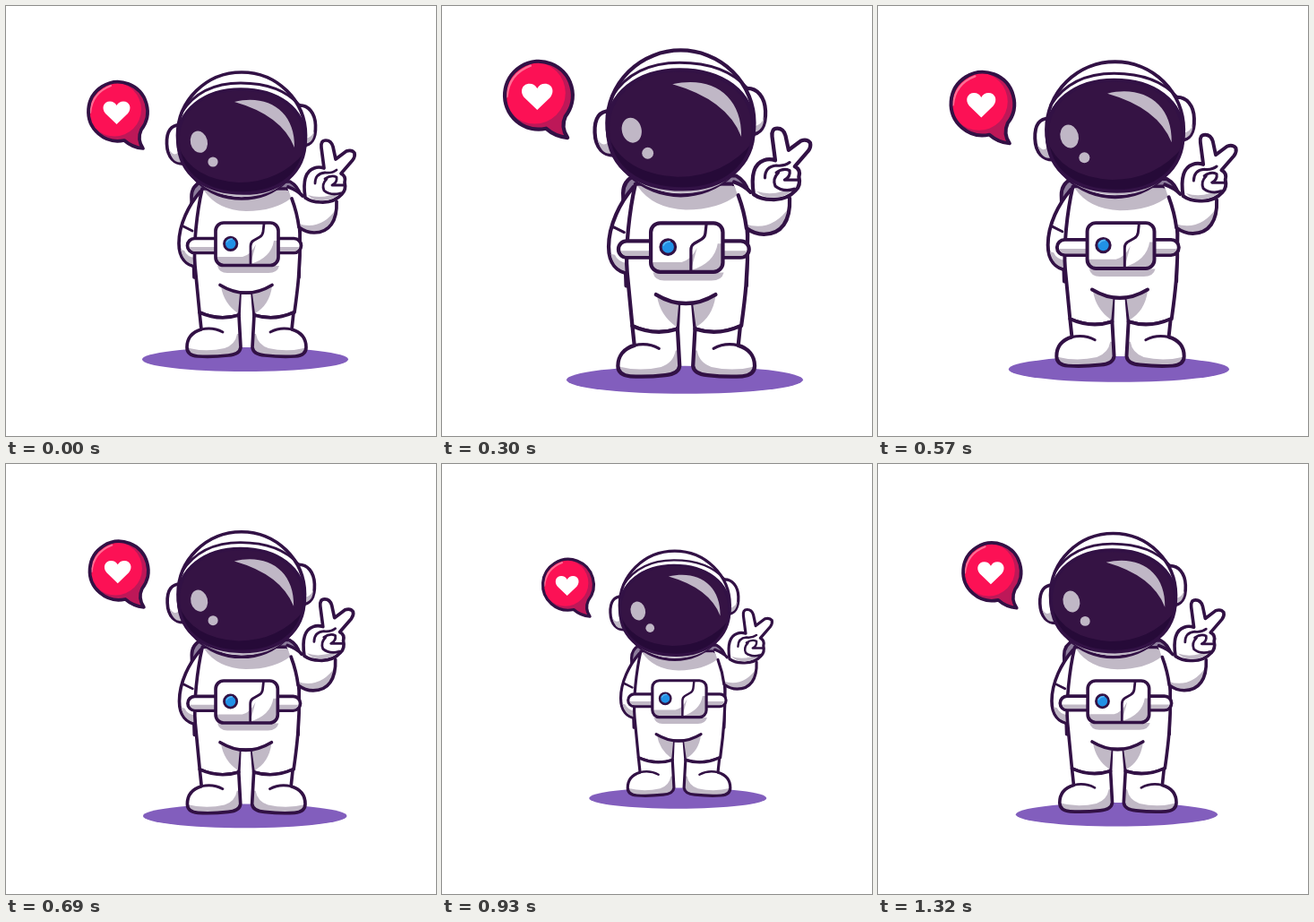
An HTML page that plays this animation: 480x480 px, repeating every 1350 ms.

```html
<!DOCTYPE html>
<html lang="en">
<head>
<meta charset="utf-8">
<title>Astronaut</title>
<style>
  html, body { margin: 0; width: 100%; height: 100%; overflow: hidden; background: #fff; }
  svg { display: block; width: 100%; height: 100%; }
  .line { fill: none; stroke: #321145; stroke-width: 3.7; stroke-linecap: round; stroke-linejoin: round; }
  .thin { stroke-width: 2.8; }
  .suit { fill: #fff; }
  .shade { fill: #c1b9c6; }
  .glass { fill: #351344; }
  .glint { fill: #c0b7c6; }
</style>
</head>
<body>
<svg viewBox="0 0 480 480">
  <defs>
    <path id="bootShape" d="M216 342Q238 352 260 345L262 381Q261 389 248 390Q230 392 214 391Q202 390 202 381C202 371 208 364 218 361Z"/>
    <path id="visorShape" d="M192 151C191 116 222 93 262 93C303 93 334 114 334 150C334 186 306 209 265 209C224 209 193 190 192 151Z"/>
    <path id="bubbleShape" d="M132 150A33 33 0 1 1 151 138Q146 149 153 159Q141 158 132 150Z"/>
    <clipPath id="bootClip"><use href="#bootShape"/></clipPath>
    <clipPath id="visorClip"><use href="#visorShape"/></clipPath>
    <clipPath id="pouchClip"><rect x="234" y="242" width="70" height="48" rx="9"/></clipPath>
    <g id="boot">
      <use class="suit" href="#bootShape"/>
      <path class="shade" clip-path="url(#bootClip)" d="M200 381Q222 387 244 382Q256 378 258 366H266V396H198Z"/>
      <use class="line" href="#bootShape"/>
      <path class="line thin" d="M218 361Q231 358 242 364"/>
    </g>
  </defs>
  <g id="scene">
    <ellipse cx="267" cy="394.500" rx="115" ry="13.500" fill="#825ebd"/>

    <!-- backpack and left arm -->
    <path class="line" style="fill:#8d7d9c" d="M218 196Q207 201 207 213L210 303H327L329 212Q326 201 317 196Z"/>
    <path class="line suit" d="M217 207C204 222 193 244 193 265C193 281 201 290 213 291L222 225Z"/>
    <path class="shade" d="M195 272Q198 287 211 289V281Q202 280 199 273Z"/>
    <path class="line thin" d="M198 246L208 251"/>

    <!-- body -->
    <path class="line suit" d="M219 204C213 230 209 268 211 290L216 342Q238 352 260 345L261 320H275L277 345Q300 352 322 342C325 320 329 292 328 254C327 230 323 214 314 204Z"/>
    <path class="shade" d="M221 206H315L319 214Q300 229 268 229Q236 228 221 206ZM236 290H305Q303 298 293 298H247Q238 298 236 290ZM240 313Q268 325 297 313Q294 334 278 343L275 321H261L259 343Q243 332 240 313Z"/>
    <path class="line" d="M239 311.500Q268 329 297 311.500"/>
    <use href="#boot"/>
    <use href="#boot" transform="matrix(-1 0 0 1 537 0)"/>

    <!-- raised arm -->
    <path class="suit" d="M314 203Q326 207 331 213L369 218C370 240 361 253 344 253Q334 252 327 247L319 216Z"/>
    <path class="shade" d="M326 243Q352 251 369 226Q367 253 344 253Q334 252 327 247Z"/>
    <path class="line" d="M315 202Q326 206 331 212M319 215Q325 231 327 247Q335 253 344 253C361 253 370 240 369 218"/>

    <!-- belt and pouch -->
    <rect class="line suit" x="202.500" y="259.500" width="127" height="16" rx="8"/>
    <path class="shade" d="M205 269H327Q326 274 321 274H211Q206 274 205 269Z"/>
    <g clip-path="url(#pouchClip)">
      <path class="suit" d="M230 240h80v60h-80z"/>
      <path class="shade" d="M232 280H264Q273 278 279 266L273 288Q296 281 299 262H306V292H232Z"/>
    </g>
    <rect class="line" x="234" y="242" width="70" height="47.500" rx="9"/>
    <path class="line thin" d="M288 243L287 252Q286.500 256 283 258L276 262Q273 264 273 268V288"/>
    <circle class="line thin" style="fill:#2191e6" cx="250.700" cy="265.300" r="7.200"/>
    <path d="M246 264Q248 260 253 260" fill="none" stroke="#58b6f3" stroke-width="1.500"/>

    <!-- helmet -->
    <path class="line suit" d="M196 133C184 132 179 140 179.500 154C180 169 188 177 200 176Z"/>
    <path class="shade" d="M182 160Q186 177 197 174L193 163Q187 169 182 160Z"/>
    <path class="line suit" d="M326 111C338 110 345 120 345.500 133C346 148 341 156 330 156Z"/>
    <path class="shade" d="M334 148Q342 147 344 139Q344 153 333 154Z"/>
    <ellipse class="line suit" cx="263" cy="144.500" rx="71.500" ry="70.500"/>
    <path class="shade" d="M203 184Q224 208 264 210Q306 210 325 180Q306 213 265 213Q224 213 203 184Z"/>
    <path class="line thin" d="M196 119Q217 86 262 86Q306 86 328 111"/>
    <use class="glass" href="#visorShape"/>
    <path d="M190 150Q203 194 260 197Q307 197 336 160V215H190Z" fill="#260a38" clip-path="url(#visorClip)"/>
    <use class="line" href="#visorShape"/>
    <path class="glint" d="M255 107C293 98 323 118 322 158Q308 122 255 107Z"/>
    <ellipse class="glint" cx="215.400" cy="151.700" rx="9.500" ry="12.300" transform="rotate(-14 215.400 151.700)"/>
    <circle class="glint" cx="231" cy="174" r="5.600"/>

    <!-- peace sign -->
    <path class="line suit" d="M334 214C332 201 332 185 344 181Q349 179 355 181L352 158Q351 150 357 150Q363 150 365 157L368 171L380 162Q386 160 389 164Q390 168 387 172L374 187Q380 190 378 197Q380 205 375 210Q366 220 351 219Q341 219 334 214Z"/>
    <path class="shade" d="M337 211Q354 217 375 206Q367 218 351 217Q342 217 337 211Z"/>
    <path class="line thin" d="M345 198Q345 187 356 186Q364 187 369 183M356 193Q363 188 369 191Q370 197 364 200H377M358 193Q352 199 355 206Q362 212 374 209"/>

    <!-- speech bubble -->
    <use href="#bubbleShape" fill="#bd1858"/>
    <circle cx="121" cy="115.500" r="30" fill="#fc1155"/>
    <path d="M94 119Q96 97 117 89" fill="none" stroke="#ff6f95" stroke-width="2.200" stroke-linecap="round"/>
    <use class="line" href="#bubbleShape"/>
    <path class="suit" d="M123.500 132L111 120C106 114 109 106.500 116 106.500Q121 106.500 123.500 111Q126 106.500 131 106.500C138 106.500 141 114 136 120Z"/>
  </g>
</svg>
<script>
  const LOOP = 1350, STEP = 30, CENTER = 240;
  const scene = document.getElementById("scene");

  function draw(now) {
    const t = Math.floor((now % LOOP) / STEP) * STEP;
    const scale = 1 + 0.15 * Math.sin(2 * Math.PI * t / LOOP);
    const shift = CENTER * (1 - scale);
    scene.setAttribute("transform", `matrix(${scale} 0 0 ${scale} ${shift} ${shift})`);
  }

  const start = performance.now();
  function tick() {
    draw(performance.now() - start);
    requestAnimationFrame(tick);
  }
  tick();
</script>
</body>
</html>
```
